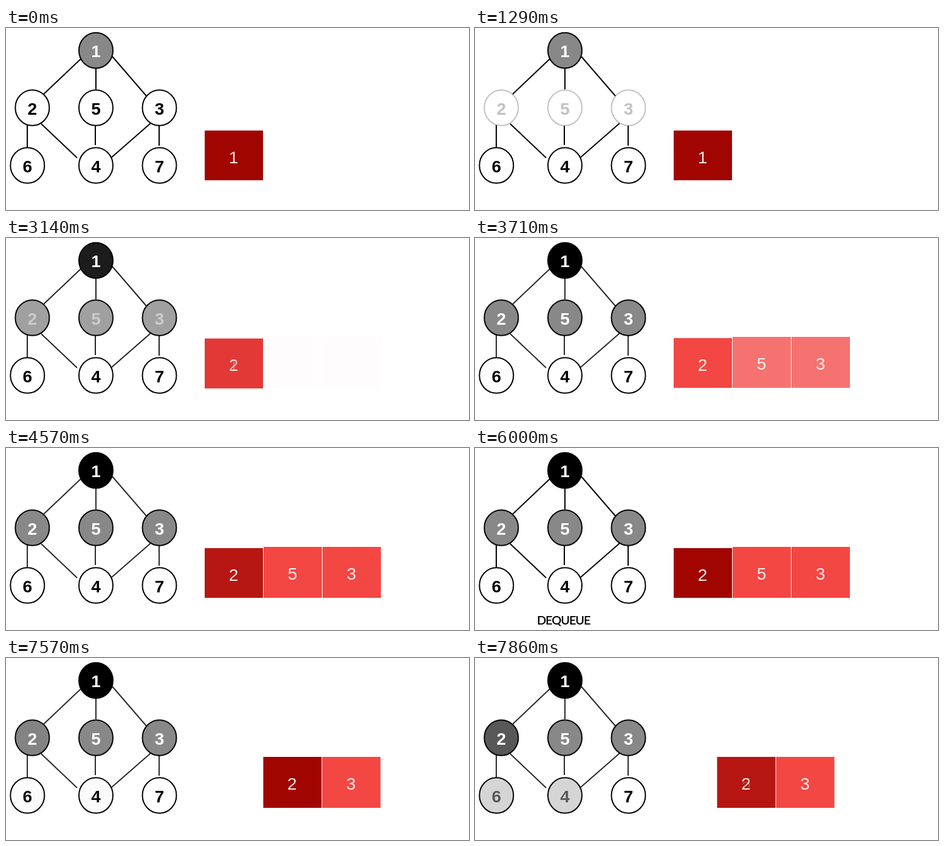
Recreate the animation shown at these times as an HTML page. Size 762 by 300 pixels, loop 8000 ms.

```html
<!DOCTYPE html>
<html lang="en">
<head>
<meta charset="utf-8">
<title>Breadth-first search</title>
<style>
  html, body { margin: 0; width: 100%; height: 100%; overflow: hidden; background: #fff; }
  svg { display: block; width: 762px; height: 300px; }
  text { font-family: "Liberation Sans", Arial, sans-serif; font-size: 28px; text-anchor: middle; }
  .node text { font-weight: bold; }
  .node ellipse { stroke: #000; stroke-width: 2; }
  .cell text { fill: #f8ebeb; }
  #label { font: 600 20px Lato, sans-serif; letter-spacing: -1.1px; text-anchor: start; }
</style>
</head>
<body>
<svg id="stage" viewBox="0 0 762 300">
  <path id="edges" fill="none" stroke-width="2"
    d="M123 51L62 109M148 67V101M175 47L231 112M35 160V197M58 158L117 214M147 161V193M238 157L174 213M252 161V194"/>
  <text id="label" x="102" y="291">DEQUEUE</text>
</svg>
<script>
const LOOP = 8000, CUT = 7430;
const WHITE = [255, 255, 255], GRAY = [136, 136, 136], BLACK = [0, 0, 0];
const RED = [243, 71, 68], DARK_RED = [160, 5, 0], INK = [42, 42, 42];
const CELL_X = 327, PITCH = 97;

const stage = document.getElementById('stage');
const edges = document.getElementById('edges');
const label = document.getElementById('label');

function add(parent, tag, attrs = {}, content = '') {
  const el = document.createElementNS('http://www.w3.org/2000/svg', tag);
  set(el, attrs);
  el.textContent = content;
  return parent.appendChild(el);
}

function set(el, attrs) {
  for (const name in attrs) el.setAttribute(name, attrs[name]);
}

const mix = (a, b, p) => a + (b - a) * p;
const blend = (a, b, p) => `rgb(${a.map((v, i) => Math.round(mix(v, b[i], p)))})`;

function ease(t, start, end) {
  const p = Math.min(1, Math.max(0, (t - start) / (end - start)));
  return p * p * (3 - 2 * p);
}

function makeNode(digit, x, y) {
  const group = add(stage, 'g', { class: 'node' });
  const disc = add(group, 'ellipse', { cx: x, cy: y, rx: 28, ry: 29.3 });
  const text = add(group, 'text', { x, y: y + 11 }, digit);
  return { group, disc, text };
}

function makeCell(digit) {
  const group = add(stage, 'g', { class: 'cell' });
  const rect = add(group, 'rect', { width: 96 });
  add(group, 'text', { x: 47.5, y: 53.5 }, digit);
  return { group, rect };
}

const nodes = {
  1: makeNode(1, 148, 37),
  2: makeNode(2, 43.3, 131.5),
  5: makeNode(5, 148, 131.5),
  3: makeNode(3, 252.5, 131.5),
  6: makeNode(6, 35.3, 226.5),
  4: makeNode(4, 148, 226.5),
  7: makeNode(7, 252.5, 226.5)
};
const cells = { 1: makeCell(1), 2: makeCell(2), 5: makeCell(5), 3: makeCell(3) };

function paintNode(id, fill, ink, opacity = 1) {
  const { group, disc, text } = nodes[id];
  set(group, { opacity });
  set(disc, { fill });
  set(text, { fill: ink });
}

function paintCell(id, x, y, fill, opacity) {
  const { group, rect } = cells[id];
  set(group, { transform: `translate(${x} ${y})`, opacity });
  set(rect, { height: 247 - Math.min(y, 165) + (y > 165 ? 0 : 0), fill });
}

function draw(t) {
  const popped = t >= CUT;
  const blink = 1 - ease(t, 70, 900) + ease(t, 900, 2140);
  const visit = ease(t, 2430, 3430);
  const enqueue = ease(t, 3090, 4000);
  const darken = ease(t, 3910, 4910);
  const next = ease(t, 7460, 8460);
  const slide = ease(t, 7525, 8525);

  // Graph
  const softEdge = popped ? 1 : visit - ease(t, 4600, 5140);
  set(edges, { stroke: blend(BLACK, INK, softEdge) });
  paintNode(1, blend(GRAY, BLACK, visit), '#fff');
  for (const id of [2, 5, 3]) {
    const shade = id === 2 && popped ? blend(GRAY, BLACK, next) : blend(WHITE, GRAY, visit);
    paintNode(id, shade, blend(BLACK, WHITE, visit), blink);
  }
  for (const id of [6, 4]) paintNode(id, blend(WHITE, GRAY, next), blend(BLACK, WHITE, next));
  paintNode(7, '#fff', '#000');

  // Queue: each new head dissolves in over the previous one
  const headX = popped ? CELL_X + PITCH * (1 - slide) : CELL_X;
  const headY = popped ? 163 : mix(169, 165, visit);
  const fiveX = popped ? headX : CELL_X + PITCH;
  paintCell(1, CELL_X, headY, blend(DARK_RED, DARK_RED, 0), visit < 1 ? 1 : 0);
  paintCell(2, headX, headY, blend(RED, DARK_RED, darken), visit);
  paintCell(5, fiveX, 163, blend(RED, RED, 0), popped ? slide : enqueue);
  paintCell(3, fiveX + PITCH, 163, blend(RED, RED, 0), enqueue);

  set(label, { opacity: popped ? 0 : ease(t, 4620, 5140) });
}

function tick() {
  draw(performance.now() % LOOP);
  requestAnimationFrame(tick);
}
tick();
</script>
</body>
</html>
```
